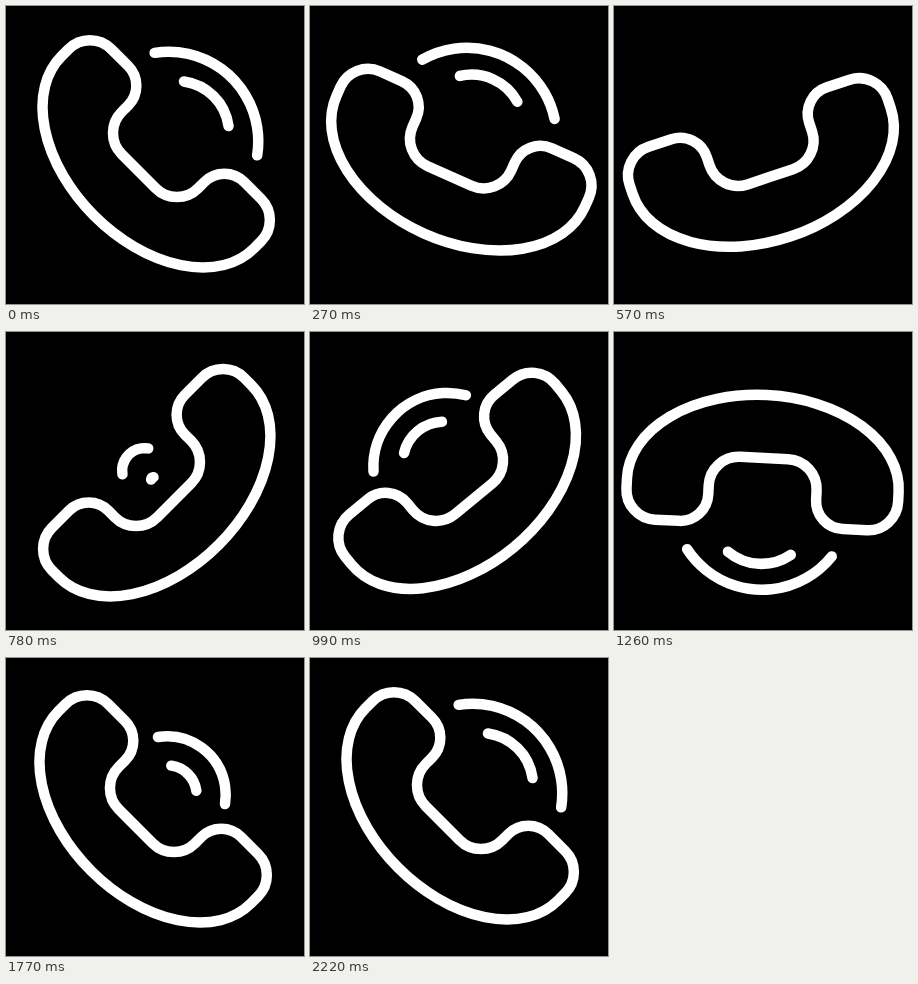
An HTML page with a canvas for the animation above (2250 ms loop, 298x298 px).

```html
<!DOCTYPE html>
<html lang="en">
<head>
<meta charset="utf-8">
<title>Ringing phone</title>
<style>
  html, body { margin: 0; width: 100%; height: 100%; overflow: hidden; background: #000; }
  canvas { display: block; width: 298px; height: 298px; }
</style>
</head>
<body>
<canvas id="stage" width="298" height="298"></canvas>
<script>
const ctx = document.getElementById('stage').getContext('2d');
const CENTER = 149;
const STEP = 30;          // ms per step; all times below are in steps
const STEPS = 75;
const TURN = 21;          // length of one turn
const FIRST_TURN = 2.66;
const SECOND_TURN = 31.54;
const WAVES_OFF = 10.9;   // after the start of a turn
const WAVES_ON = 21.5;
const WAVES_GROW = 20;
const SHAKE_START = 22.1;
const SHAKE_PERIOD = 4.3;

const clamp = x => Math.min(1, Math.max(0, x));
const easeOut = x => 1 - (1 - clamp(x)) ** 3;
const rad = deg => deg * Math.PI / 180;

function easeInOutBack(x) {
  const k = 2.595;
  const a = 2 * clamp(x);
  if (a < 1) return a * a * ((k + 1) * a - k) / 2;
  const b = a - 2;
  return (b * b * ((k + 1) * b + k) + 2) / 2;
}

// Handset with its hollow side facing up
function drawHandset() {
  ctx.beginPath();
  ctx.moveTo(0, 23);
  ctx.arcTo(-54, 23, -54, -10, 30);
  ctx.arcTo(-54, -44, -95, -44, 28);
  ctx.arcTo(-136, -44, -136, -4, 30);
  ctx.lineTo(-136, -4);
  ctx.ellipse(0, -4, 136, 90, 0, Math.PI, 0, true);
  ctx.arcTo(136, -44, 95, -44, 30);
  ctx.arcTo(54, -44, 54, -10, 28);
  ctx.arcTo(54, 23, 0, 23, 30);
  ctx.closePath();
  ctx.stroke();
}

// Arc above the center, given by its chord and half its opening angle
function drawWave(chord, height, halfAngle) {
  const half = rad(halfAngle);
  const radius = chord / 2 / Math.sin(half);
  const middle = -Math.PI / 2;
  ctx.beginPath();
  ctx.arc(0, -height + radius * Math.cos(half), radius, middle - half, middle + half);
  ctx.stroke();
}

function drawWaves(growth) {
  const inner = (growth - 0.21) / 0.79;
  if (growth > 0) drawWave(145 * growth, 13 + 59 * growth, 54);
  if (inner > 0) drawWave(63 * inner, 72.5 * inner, 37);
}

function shakeOffset(local) {
  const phase = (local - SHAKE_START) / SHAKE_PERIOD;
  return phase > 0 && phase < 1.5 ? 4.3 * Math.sin(2 * Math.PI * phase) : 0;
}

function draw(step) {
  const second = step >= SECOND_TURN;
  const local = step - (second ? SECOND_TURN : FIRST_TURN);
  const sincePrevious = second ? step - FIRST_TURN : step + STEPS - SECOND_TURN;
  const turned = 270 * easeInOutBack(local / TURN);
  const angle = second ? 315 - turned : 45 + turned;
  // Waves keep growing into the next turn until it hides them
  const waveAge = local < WAVES_OFF ? sincePrevious : local;
  const growth = easeOut((waveAge - WAVES_ON) / WAVES_GROW);

  ctx.fillStyle = '#000';
  ctx.fillRect(0, 0, 298, 298);
  ctx.save();
  ctx.translate(CENTER, CENTER);
  ctx.rotate(rad(angle));
  ctx.strokeStyle = '#fff';
  ctx.lineWidth = 10.5;
  ctx.lineCap = ctx.lineJoin = 'round';
  drawWaves(growth);
  ctx.translate(0, shakeOffset(local));
  drawHandset();
  ctx.restore();
}

let start;
function tick(now) {
  start ??= now;
  draw(Math.floor((now - start) / STEP) % STEPS);
  requestAnimationFrame(tick);
}
draw(0);
requestAnimationFrame(tick);
</script>
</body>
</html>
```
